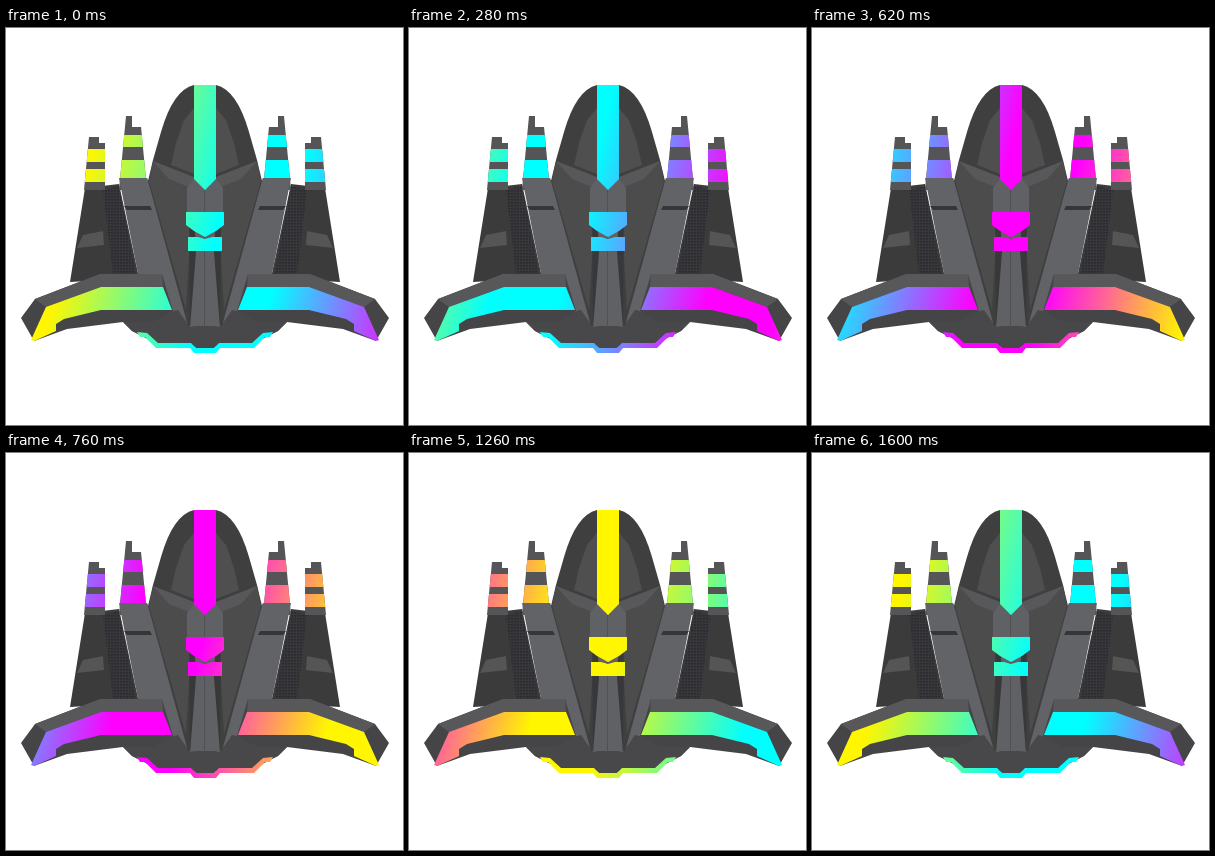
An HTML page that plays this animation: 397 by 397 pixels, repeating every 1.62 s.

```html
<!DOCTYPE html>
<html>
<head>
<meta charset="utf-8">
<style>
html, body { margin: 0; height: 100%; overflow: hidden; background: #fff; }
svg { display: block; width: 100vw; height: 100vh; }
</style>
</head>
<body>
<svg viewBox="0 0 397 397">
  <defs>
    <linearGradient id="glow" gradientUnits="userSpaceOnUse" spreadMethod="repeat" x2="612" y2="153"/>
    <pattern id="grille" width="3" height="3" patternUnits="userSpaceOnUse">
      <path d="M0 0h3v3h-3z" fill="#38383a"/><path d="M0 0h2v1.5h-2z" fill="#2a2a30"/>
    </pattern>

    <!-- left half of the hull, back to front -->
    <g id="hull">
      <path fill="#3b3b3b" d="M79 160L113 156 133 250 64 254z"/>
      <path fill="url(#grille)" d="M97 162L113 158 130 247 107 247z"/>
      <path fill="#555" d="M71 220L77 207 97 203 98 217z"/>
      <path id="prongs" fill="#555557"/>
      <path fill="#626367" d="M113 150L141 150 150 166 186 300 184 316 152 316 126 303 117 294 132 246z"/>
      <path fill="#363638" d="M118 178H144L146 182H121z"/>
      <path fill="#48484a" d="M117 294L172 282 184 299V316H152L126 303z"/>
      <!-- cockpit and fuselage -->
      <path fill="#3f3f40" d="M199.5 57H188Q167 62 155 104L147 132 142 153 182 298H199.5z"/>
      <path fill="#4f4f50" d="M188 80L178 92 170 115 165 137 188 146z"/>
      <path fill="#4c4c4d" d="M147 133L187 150 183 230 180 282 143 153z"/>
      <path fill="#58585b" d="M147 133L188 149V161L163 151z"/>
      <path fill="#38383a" d="M183 158H199.5V299H184z"/>
      <path fill="#606164" d="M181 160L188 151H199.5V300H184L190 224 188 184H181z"/>
      <path fill="#48484a" d="M190 298H199.5V320H190L183 315 184 299z"/>
      <!-- wing -->
      <path fill="#454547" d="M15 290L29 271 94 246H156L167 283 147 294H117L61 301 28 313z"/>
      <path fill="#58585a" d="M29 271L94 246H156L157 259H95L40 279z"/>
    </g>

    <clipPath id="lights">
      <path id="lamps" d="
        M25 312L40 279 95 259H157L166 282H95L58 291 50 296V303L28 313z
        M199.5 57H188V151L199 162h.5z
        M180 184H199.5V209H199L188 203 180 197z
        M182 209H192L199 211h.5V223H182z
        M131 304L141 305 152 315H185L190 320H199.5V325H188L184 320H150L139 309H134z"/>
      <use href="#lamps" transform="matrix(-1 0 0 1 398 0)"/>
    </clipPath>
  </defs>
  <use href="#hull"/>
  <use href="#hull" transform="matrix(-1 0 0 1 398 0)"/>
  <path d="M0 0H397V397H0z" fill="url(#glow)" clip-path="url(#lights)"/>
</svg>
<script>
const LOOP = 1620, STEP = 20;
const WAVE = 650, OFFSET = 45, PLATEAU = 70 / WAVE;
const COLORS = ['#fff600', '#0ff', '#f0f'];
const $ = id => document.getElementById(id);

// Each colour holds for a plateau, then blends into the next.
const stop = (offset, color) => `<stop offset="${offset}" stop-color="${color}"/>`;
$('glow').innerHTML = COLORS
  .map((color, i) => stop(i / 3, color) + stop(i / 3 + PLATEAU, color))
  .join('') + stop(1, COLORS[0]);

// A tapered prong with a notched tip; its lamps are slices of the taper.
function addProng({ top, base, left, right, notch, bands }) {
  const edge = ([a, b], y) => a + (b - a) * (y - top) / (base - top);
  const slice = (y1, y2) =>
    `M${edge(left, y1)} ${y1}H${edge(right, y1)}L${edge(right, y2)} ${y2}H${edge(left, y2)}z`;
  const [x, y] = notch;
  const tip = `M${left[0]} ${top}H${x}V${y}H${edge(left, y)}z`;
  $('prongs').setAttribute('d', ($('prongs').getAttribute('d') || '') + tip + slice(y, base));
  $('lamps').setAttribute('d', $('lamps').getAttribute('d') + bands.map(b => slice(...b)).join(''));
}
addProng({ top: 109, base: 162, left: [83, 78], right: [99, 99], notch: [93, 115], bands: [[121, 134], [141, 154]] });
addProng({ top: 88, base: 162, left: [120, 113], right: [134, 141], notch: [126, 99], bands: [[107, 119], [132, 150]] });

const start = performance.now();
function draw() {
  const time = Math.floor((performance.now() - start) % LOOP / STEP) * STEP;
  $('glow').setAttribute('gradientTransform', `translate(${OFFSET - WAVE * time / LOOP})`);
  requestAnimationFrame(draw);
}
draw();
</script>
</body>
</html>
```
